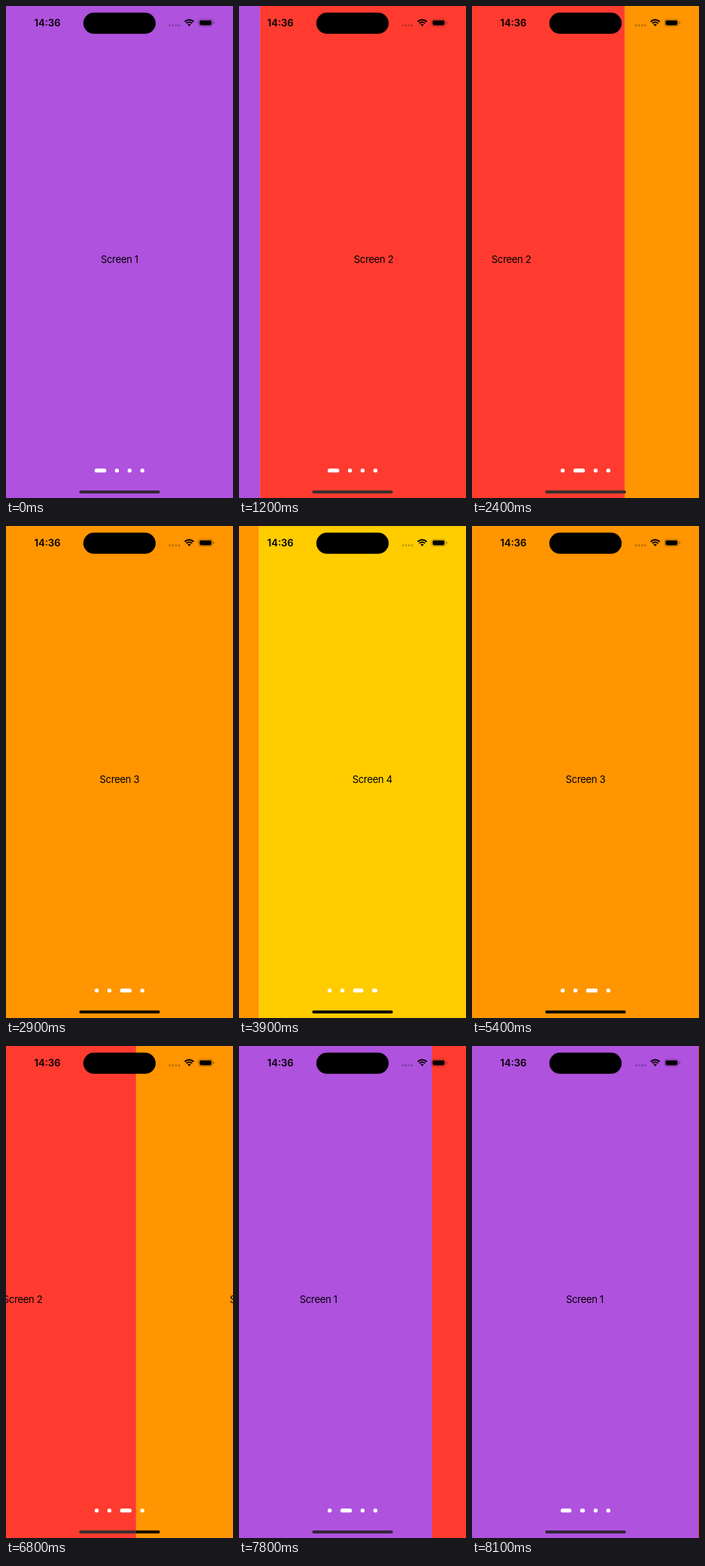
Animation of 300x651 px, one loop 8.2 s. Source, as an HTML page:

```html
<!DOCTYPE html>
<html lang="en">
<head>
<meta charset="utf-8">
<title>Paged screens</title>
<style>
  html, body { margin: 0; width: 100%; height: 100%; overflow: hidden; }
  svg { display: block; width: 100vw; height: 100vh; }
  text { font: 13px Inter, Roboto, sans-serif; text-anchor: middle; }
  .label { letter-spacing: -.33px; }
  .clock { font-weight: 600; }
</style>
</head>
<body>
<svg viewBox="0 0 300 651">
  <clipPath id="home"><rect x="96.8" y="641.1" width="106.6" height="3.8" rx="1.9"/></clipPath>
  <clipPath id="wedge"><path d="M242.1 26.8L226 10.7H258.2z"/></clipPath>

  <g id="pages"></g>
  <g clip-path="url(#home)"><g id="bars"></g></g>
  <g id="dots" fill="#fff"></g>

  <text class="clock" x="54.7" y="27.3">14:36</text>
  <rect x="102.2" y="8.8" width="95.6" height="28" rx="14"/>
  <g opacity=".25">
    <circle cx="216.7" cy="25.7" r="1.4"/>
    <circle cx="220.7" cy="25.7" r="1.4"/>
    <circle cx="224.7" cy="25.7" r="1.4"/>
    <circle cx="228.7" cy="25.7" r="1.4"/>
  </g>
  <g clip-path="url(#wedge)" fill="none" stroke="#000" stroke-width="1.9">
    <circle cx="242.1" cy="26.6" r="8.3"/>
    <circle cx="242.1" cy="26.6" r="5.2"/>
    <circle cx="242.1" cy="26.6" r="1.4" stroke-width="2.8"/>
  </g>
  <rect x="254.4" y="17.6" width="18.6" height="9.2" rx="2.9" fill="none" stroke="#000" stroke-width=".8" opacity=".35"/>
  <rect x="255.8" y="19" width="15.8" height="6.4" rx="1.8"/>
  <path d="M274.2 20.7q1.1.4 1.1 1.5t-1.1 1.5z" opacity=".45"/>
</svg>
<script>
const LOOP = 8200, STEP = 100, WIDTH = 300;
const COLORS = ['#af52de', '#ff3b30', '#ff9500', '#ffcc00'];
const BARS = ['#33263a', '#3a302f', '#1a1000', '#0c0900'];
const DOT = 5.34, PILL = 15.27, GAP = 11.45;

// [swipe start, dot change start, from page, to page, distance left at start]
const SWIPES = [
  [1200, 1200, 0, 1, .093],
  [2400, 2430, 1, 2, .673],
  [3700, 3810, 2, 3, 1.11],
  [4900, 4930, 3, 2, .7],
  [6800, 6810, 2, 1, .427],
  [7800, 7820, 1, 0, .15]
];

function add(parent, tag, attrs, text = '') {
  const el = document.createElementNS('http://www.w3.org/2000/svg', tag);
  for (const key in attrs) el.setAttribute(key, attrs[key]);
  el.textContent = text;
  return parent.appendChild(el);
}

const [pages, bars, dotRow] = ['pages', 'bars', 'dots'].map(id => document.getElementById(id));
const dots = COLORS.map((fill, i) => {
  const box = { x: i * WIDTH, width: WIDTH, height: 651 };
  add(pages, 'rect', { ...box, fill });
  add(pages, 'text', { class: 'label', x: i * WIDTH + 150, y: 340.2 }, `Screen ${i + 1}`);
  add(bars, 'rect', { ...box, fill: BARS[i] });
  return add(dotRow, 'rect', { y: 612, height: DOT, rx: DOT / 2 });
});

const ease = x => x * x * (3 - 2 * x);

function draw(t) {
  const swipe = SWIPES.findLast(s => t >= s[0]) || [0, 0, 0, 0, 0];
  const [start, dotStart, from, to, left] = swipe;

  let rest = Math.min(.92, left * .28 ** ((t - start) / 100));
  if (rest < .003) rest = 0;
  const shift = `translate(${-WIDTH * (to + (from - to) * rest)})`;
  pages.setAttribute('transform', shift);
  bars.setAttribute('transform', shift);

  const k = ease(Math.min(1, Math.max(0, (t - dotStart) / 350)));
  let x = 117.2;
  dots.forEach((dot, i) => {
    const active = (i === to) * k + (i === from) * (1 - k);
    const width = DOT + (PILL - DOT) * active;
    dot.setAttribute('x', x);
    dot.setAttribute('width', width);
    x += width + GAP;
  });
}

const begin = performance.now();
function tick() {
  const t = (performance.now() - begin) % LOOP;
  draw(Math.floor(t / STEP) * STEP);
  requestAnimationFrame(tick);
}
tick();
</script>
</body>
</html>
```
